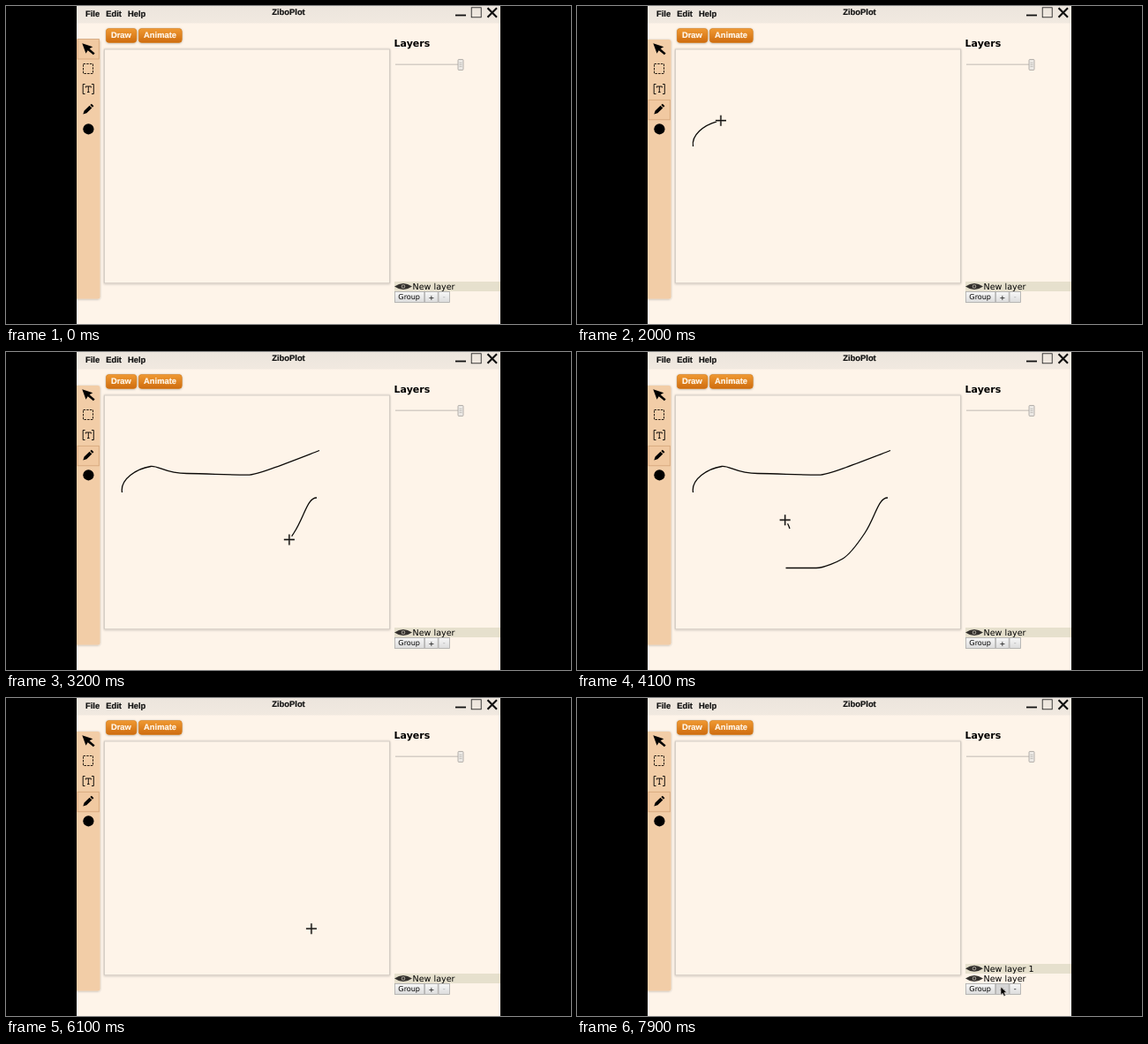
An HTML page for the animation above (8 s loop, 640 by 360 pixels).

```html
<!DOCTYPE html>
<html lang="en">
<head>
<meta charset="utf-8">
<title>Drawing app</title>
<style>
html, body { margin: 0; width: 100%; height: 100%; overflow: hidden; background: #000; }
svg { display: block; width: 100%; height: 100%; }
text { text-rendering: geometricPrecision; }
.bold { font: bold 9.4px "Liberation Sans", Arial, sans-serif; fill: #111; stroke: #111; stroke-width: .2; }
.head { font: bold 11px "DejaVu Sans", sans-serif; }
.layer { font: 9.6px "DejaVu Sans", sans-serif; }
.btn { font: 8.1px "DejaVu Sans", sans-serif; text-anchor: middle; }
.mid { text-anchor: middle; }
.tab rect { fill: url(#orange); stroke: #cf7816; stroke-width: .6; filter: url(#soft); }
.tab text { fill: #fff6ea; stroke: #fff6ea; text-anchor: middle; }
.button rect { fill: url(#grey); stroke: #a9a9a9; stroke-width: .8; }
.ink { fill: none; stroke: #0c0a08; stroke-width: 1.3; stroke-linejoin: round; }
</style>
</head>
<body>
<svg viewBox="0 0 640 360">
  <defs>
    <linearGradient id="orange" x2="0" y2="1">
      <stop stop-color="#f09a34"/><stop offset="1" stop-color="#cf6c0e"/>
    </linearGradient>
    <linearGradient id="grey" x2="0" y2="1">
      <stop stop-color="#f8f8f8"/><stop offset="1" stop-color="#dcdcdc"/>
    </linearGradient>
    <linearGradient id="bar" x2="0" y2="1">
      <stop stop-color="#ece5dd"/><stop offset="1" stop-color="#f1e9e0"/>
    </linearGradient>
    <filter id="soft" x="-10%" y="-10%" width="120%" height="130%">
      <feDropShadow dx="0" dy=".5" stdDeviation=".8" flood-opacity=".3"/>
    </filter>
    <g id="eye">
      <path d="M0 0Q10-7 20 0Q10 7 0 0Z" fill="#33302d"/>
      <circle cx="10" r="2.2" fill="#aaa59c"/>
      <circle cx="10" r="1.3" fill="#33302d"/>
    </g>
  </defs>

  <rect x="80" width="480" height="360" fill="#fef4e9"/>
  <rect x="80" width="480" height="19.5" fill="url(#bar)"/>
  <g class="bold">
    <text x="90" y="12.3">File</text>
    <text x="113.2" y="12.3">Edit</text>
    <text x="138" y="12.3">Help</text>
    <text x="320" y="10.4" class="mid">ZiboPlot</text>
  </g>
  <g fill="none" stroke="#111">
    <path d="M509 10.5h12" stroke-width="1.8"/>
    <rect x="527.2" y="1.8" width="11" height="11" stroke-width=".8"/>
    <path d="M545.5 2.3l10.5 10.5m0-10.5l-10.5 10.5" stroke-width="2.2"/>
  </g>

  <g class="tab bold">
    <rect x="113.3" y="25.4" width="34.6" height="16" rx="3.5"/>
    <rect x="150.3" y="25.4" width="49" height="16" rx="3.5"/>
    <text x="130.4" y="36.2">Draw</text>
    <text x="174.6" y="36.2">Animate</text>
  </g>

  <path d="M80 38h24q2.5 0 2.5 2.5v288.500q0 2.500-2.500 2.500h-24z" fill="#f2cda7" filter="url(#soft)"/>
  <rect id="hover" x="81" y="106.300" width="24.500" height="22.500" fill="#e4b08a"/>
  <rect id="selected" x="81" y="37.500" width="24.300" height="22.500" fill="#f1c9a1" stroke="#d3a478" stroke-width=".8"/>
  <path d="M86.300 42.200l12 4-3.700 2 6 5.200-1.700 1.800-6.200-5-2.200 3.600z"/>
  <rect x="87.500" y="65.500" width="11" height="11" fill="none" stroke="#2a1e14" stroke-dasharray="2.500 1.200"/>
  <path d="M89.500 88.500h-2.300v11h2.300m7.500 0h2.300v-11h-2.300M90.300 92.500v-1.500h6v1.500m-3-1.500v6.500m-1.300 0h2.600" fill="none" stroke="#15100c"/>
  <path d="M87.300 122.500l1.300-4 6-5.700 2.700 2.700-6 5.800zM95.300 112.100l1.600-1.400 2.500 2.500-1.500 1.600z"/>
  <circle cx="93.400" cy="139.300" r="6.100"/>

  <rect x="111.500" y="49" width="323" height="264.700" fill="#fef4e9" stroke="#d6cec5" filter="url(#soft)"/>

  <text x="439.600" y="45.700" class="head">Layers</text>
  <path d="M441 66.300h74" stroke="#d5cec5" stroke-width="1.500"/>
  <rect x="512" y="60.500" width="6" height="12" rx="1" fill="#ebe8e4" stroke="#a5a19c" stroke-width=".8"/>
  <path d="M513.500 64.500h3m-3 2h3m-3 2h3" stroke="#b5b2ae" stroke-width=".7"/>

  <rect id="row" x="440" y="312" width="120" height="11" fill="#e6e0cd"/>
  <use href="#eye" x="440" y="317.500"/>
  <text x="460.500" y="321" class="layer">New layer</text>
  <g id="added">
    <use href="#eye" x="440" y="306.300"/>
    <text x="460.500" y="309.800" class="layer">New layer 1</text>
  </g>
  <g class="button btn">
    <rect x="440.400" y="323.400" width="33.400" height="12"/>
    <rect id="plus" x="474.400" y="323.400" width="14.800" height="12"/>
    <rect x="490" y="323.400" width="12.400" height="12"/>
    <text x="456.700" y="332.300">Group</text>
    <text x="481.800" y="332.500">+</text>
    <text id="minus" x="496.200" y="332.300">-</text>
  </g>

  <g id="ink"></g>
  <g id="cursor">
    <path id="arrow" d="M0 0v9.200l2.200-1.900 1.500 3.300 1.700-.8-1.500-3.200h3z" stroke="#e8e0d8" stroke-width=".6"/>
    <path id="hand" d="M-1 .5q1-1 2 0v3l4 .8q1 .4.700 2l-.7 2.700h-5.500l-2.500-3.500q0-1.200 2-.5z" stroke="#d9a985" stroke-width=".3"/>
    <g id="cross" fill="none">
      <path d="M-6 0h12M0-6v12" stroke="#b9b0a6" stroke-width="2.400"/>
      <path d="M-6 0h12M0-6v12" stroke="#111" stroke-width="1.200"/>
    </g>
  </g>
</svg>
<script>
const LOOP = 8, FPS = 10, INK_LAG = 5;
const $ = id => document.getElementById(id);

// Every leg of the cursor's way, in seconds; ease is the power of time, undo marks a drawn stroke.
const legs = [
  { from: .1, to: .5, d: "M93 43L468 324" },
  { from: .6, to: 1.1, d: "M468 324L94 118.5" },
  { from: 1.3, to: 1.7, d: "M94 118.5L131.5 159" },
  { from: 1.7, to: 2.45, ease: 1.8, undo: 6,
    d: "M131.5 159C129 144 148 132 164 129.5C173 128.5 180 137.500 205 137.500S245 139.200 274 139.200C285 139 320 125 355 111.500" },
  { from: 2.5, to: 2.8, d: "M355 111.500L352 165" },
  { from: 2.8, to: 3.7, ease: 1.2, undo: 5.9,
    d: "M352 165C341 165 338 187 326 205S306 231 301 234S280 244.500 271 244.500H236.500" },
  { from: 3.7, to: 4, d: "M236.500 244.500L241 200" },
  { from: 4, to: 5.2, ease: 1.15, undo: 5.7,
    d: "M241 200C238 191 232 182 212 182S152 194 152.500 211S180 235 203 228S222 229 229.500 229" },
  { from: 5.9, to: 6.6, ease: .7, d: "M229.500 229C290 238 344 260 360 267S450 333 498 333" },
  { from: 6.6, to: 7.1, d: "M498 333L488 330" },
  { from: 7.3, to: 7.9, d: "M488 330C455 322 455 290 480 327" }
];

for (const leg of legs) {
  leg.path = document.createElementNS("http://www.w3.org/2000/svg", "path");
  leg.path.setAttribute("d", leg.d);
  leg.length = leg.path.getTotalLength();
  if (leg.undo) {
    leg.path.setAttribute("class", "ink");
    $("ink").append(leg.path);
  }
}

function show(id, on) {
  $(id).style.display = on ? "" : "none";
}

function travelled({ from, to, ease = 1, length }, time) {
  const k = Math.min(1, Math.max(0, (time - from) / (to - from)));
  return length * k ** ease;
}

function render(time) {
  for (const leg of legs.filter(leg => leg.undo)) {
    const way = travelled(leg, time);
    const inked = time < leg.to ? way - INK_LAG : leg.length;
    leg.path.style.display = inked > 0 && time < leg.undo ? "" : "none";
    leg.path.style.strokeDasharray = `${Math.max(0, inked)} ${leg.length}`;
  }

  const leg = legs.findLast(leg => leg.from <= time) ?? legs[0];
  const { x, y } = leg.path.getPointAtLength(travelled(leg, time));
  $("cursor").setAttribute("transform", `translate(${x} ${y})`);

  const penActive = time >= 1.3;
  const onPen = time >= 1.1 && !penActive;
  const drawing = penActive && x < 434;
  show("cross", drawing);
  show("hand", onPen);
  show("arrow", time > 0 && !drawing && !onPen);
  show("hover", onPen);
  $("selected").setAttribute("y", penActive ? 106.3 : 37.5);

  const layerAdded = time >= 7;
  show("added", layerAdded);
  $("row").setAttribute("y", layerAdded ? 301 : 312);
  $("minus").setAttribute("fill", layerAdded ? "#000" : "#aaa");
  const onPlus = x > 474 && x < 489 && y > 323 && y < 335;
  $("plus").style.fill = onPlus ? "#d6d6d6" : "";
}

function frame() {
  const time = performance.now() / 1000 % LOOP;
  render(Math.floor(time * FPS) / FPS);
  requestAnimationFrame(frame);
}
frame();
</script>
</body>
</html>
```
